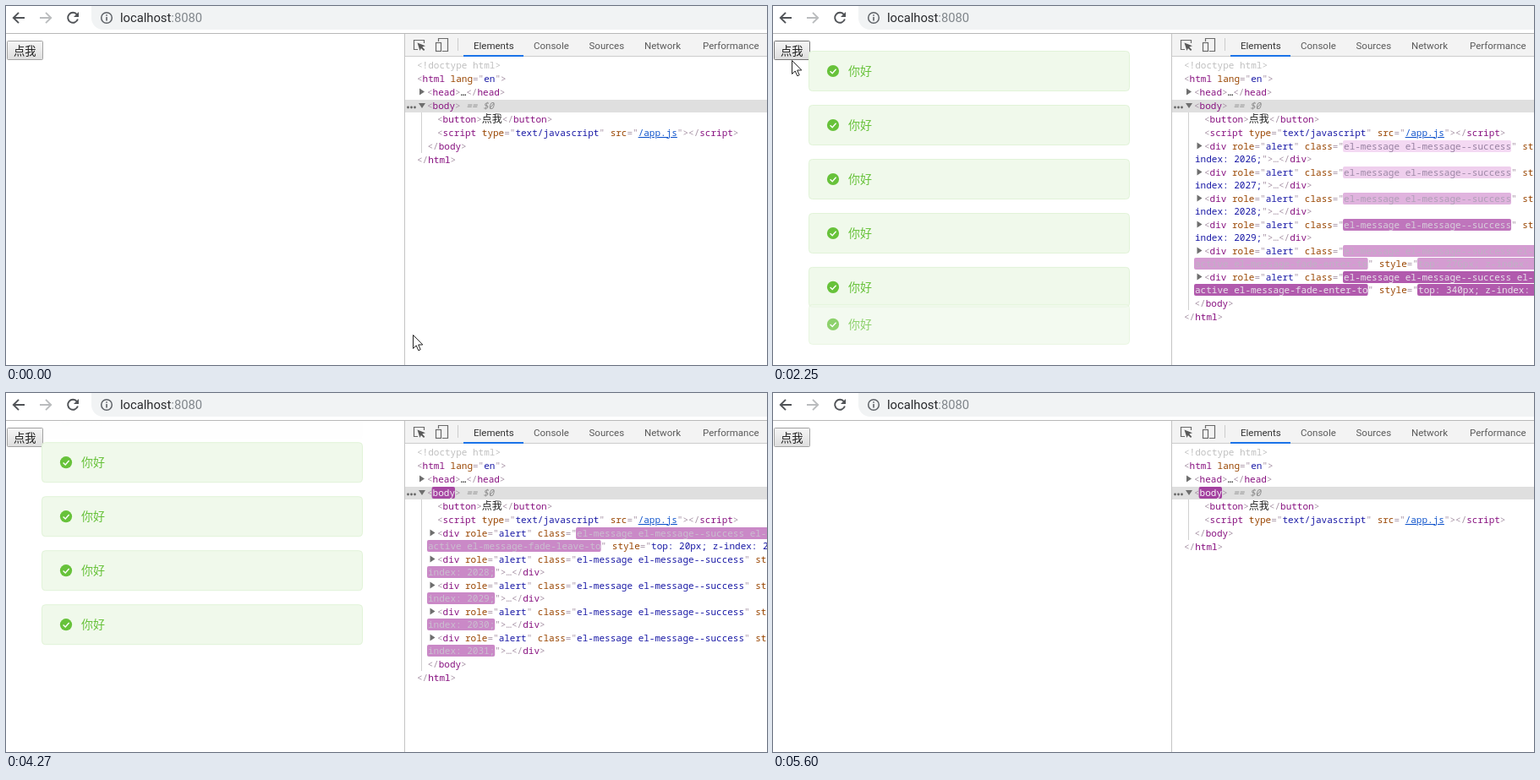
An HTML page that plays this animation: 900 by 425 pixels, repeating every 5.67 s.

```html
<!DOCTYPE html>
<html lang="en">
<head>
<meta charset="utf-8">
<title>Message demo</title>
<style>
html, body { margin: 0; width: 100%; height: 100%; overflow: hidden; background: #fff; }
svg { display: block; width: 100vw; height: 100vh; }
text { white-space: pre; }
.ui { font-family: Roboto, "Open Sans", sans-serif; }
.cjk { font-family: "Noto Sans CJK SC", "Noto Sans CJK", sans-serif; }
.code { font: 11px "Noto Sans Mono", "DejaVu Sans Mono", monospace; }
.code .cjk { font-size: 12px; fill: #222; }
.p { fill: #a894a6; }
.t { fill: #881280; }
.a { fill: #994500; }
.v { fill: #1a1aa6; }
.link { fill: #1155cc; text-decoration: underline; }
.doc { fill: #c0c0c0; }
.sel { fill: #8a8a8a; font-style: italic; }
.dots { fill: #303030; }
.arrow { fill: #6e6e6e; }
</style>
</head>
<body>
<svg viewBox="0 0 900 425" preserveAspectRatio="none">
  <defs>
    <linearGradient id="face" x2="0" y2="1">
      <stop offset="0" stop-color="#f6f6f6"/><stop offset="1" stop-color="#dedede"/>
    </linearGradient>
    <clipPath id="page"><rect y="33" width="471" height="392"/></clipPath>
  </defs>
  <rect width="900" height="425" fill="#fff"/>

  <!-- address bar -->
  <path d="M900 0H101V14A14 14 0 0 0 115 28H900Z" fill="#f1f3f4"/>
  <rect y="32" width="900" height="1" fill="#b8b8b8"/>
  <g fill="none" stroke-width="1.9">
    <path d="M22 14H9.5M15 7.8L8.8 14L15 20.2" stroke="#505357"/>
    <path d="M40 14H52.500M47 7.800L53.200 14L47 20.200" stroke="#babcbe"/>
    <path d="M84 10.200A6 6 0 1 0 84.900 15.500" stroke="#505357"/>
    <circle cx="119" cy="14" r="6.300" stroke="#5f6368" stroke-width="1.500"/>
    <path d="M119 13V17.500M119 10.200V11.800" stroke="#5f6368" stroke-width="1.600"/>
  </g>
  <path d="M86 7V13H80Z" fill="#505357"/>
  <text class="ui" x="135" y="19" font-size="14.75" fill="#28292c">localhost<tspan fill="#80868b">:8080</tspan></text>

  <!-- page -->
  <g clip-path="url(#page)">
    <rect id="button" x="1.5" y="41.5" width="42" height="22" rx="1" fill="url(#face)"/>
    <text class="cjk" x="9" y="58" font-size="13.33" fill="#222">点我</text>
    <g id="messages"></g>
  </g>

  <!-- inspector -->
  <rect x="472" y="33" width="428" height="27" fill="#f3f3f3"/>
  <rect x="472" y="59" width="428" height="1" fill="#ccc"/>
  <rect x="471" y="33" width="1" height="392" fill="#c4c4c4"/>
  <g fill="none" stroke="#6a6a6a" stroke-width="1.200">
    <path d="M487 51.500H482.500V40.500H494.500V44"/>
    <path d="M511.500 42V38.500H522.500V53.500H516"/>
    <rect x="508.500" y="43.500" width="6" height="10"/>
  </g>
  <path d="M486.500 43.500L496 47.300L492.300 48.600L495.300 51.800L494 53L490.900 49.900L489.500 53Z" fill="#5a5a5a"/>
  <rect x="534" y="38" width="1" height="15" fill="#ccc"/>
  <rect x="541" y="58" width="71" height="2" fill="#1a73e8"/>
  <g id="tabs" class="ui" font-size="11.5"></g>
  <rect x="472" y="111" width="428" height="15" fill="#dfdfdf"/>
  <g id="tree" class="code"></g>

  <path id="cursor" d="M.5 .5V16.500L4.200 13L6.800 18.800L9.200 17.700L6.700 12H11.800Z" fill="#fff" stroke="#222"/>
</svg>
<script>
const LOOP = 5670, STEP = LOOP / 73;
const CH = 6.6;                       // code column width
const ROW = 31;                       // height of a two-line node
const opens  = [820, 1060, 1340, 1641, 1880, 2118];
const closes = [3795, 4000, 4305, 4615, 4880, 5130];
const OPEN_LAG = 60, CLOSE_LAG = 45, MOVE = 400, FADE = 300, FLASH = 1400;

const $ = id => document.getElementById(id);
const clamp = x => Math.min(1, Math.max(0, x));
const mix = (a, b, k) => a + (b - a) * k;
const rgb = (a, b, k) => `rgb(${a.map((c, i) => Math.round(mix(c, b[i], k)))})`;

function bezier(x1, y1, x2, y2) {
  const at = (a, b, s) => 3 * a * s * (1 - s) ** 2 + 3 * b * s * s * (1 - s) + s ** 3;
  return x => {
    if (x <= 0) return 0;
    if (x >= 1) return 1;
    let lo = 0, hi = 1;
    for (let n = 0; n < 24; n++) {
      const mid = (lo + hi) / 2;
      if (at(x1, x2, mid) < x) lo = mid; else hi = mid;
    }
    return at(y1, y2, lo);
  };
}
const ease = bezier(.25, .1, .25, 1);
const settle = bezier(0, 0, .2, 1);
const glide = bezier(.42, 0, .58, 1);

// ---- page messages ----
function messageTop(i, t) {
  let from = 53 + 64 * i, to = from, start = 0;
  for (let k = 0; k < i && closes[k] <= t; k++) {
    from = mix(from, to, ease((closes[k] - start) / MOVE));
    to -= 64;
    start = closes[k];
  }
  return mix(from, to, ease((t - start) / MOVE));
}

function message(i, t) {
  const age = t - opens[i], gone = t - closes[i];
  if (age <= 0 || gone >= MOVE) return '';
  const shift = ease(age / MOVE) - 1 - ease(gone / MOVE);
  const alpha = ease(age / FADE) * (1 - ease(gone / FADE));
  const y = messageTop(i, t) + 48 * shift;
  return `<g transform="translate(42 ${y.toFixed(2)})" opacity="${alpha.toFixed(3)}">
    <rect x=".5" y=".5" width="379" height="47" rx="4" fill="#f0f9eb" stroke="#e1f3d8"/>
    <circle cx="29" cy="24" r="7.1" fill="#67c23a"/>
    <path d="M25.600 24.200L28.200 26.700L32.600 21.800" fill="none" stroke="#fff" stroke-width="1.400"/>
    <text class="cjk" x="47" y="29" font-size="14" fill="#67c23a">你好</text></g>`;
}

// ---- element tree ----
const span = (cls, s) => `<tspan class="${cls}">${s}</tspan>`;
const p = s => span('p', s.replace(/</g, '&lt;').replace(/>/g, '&gt;'));
const tag = s => span('t', s), attr = s => span('a', s), val = s => span('v', s);
const line = (x, y, s) => `<text x="${x}" y="${y}">${s}</text>`;
const end = name => p('</') + tag(name) + p('>');
const right = (x, y) => `<path class="arrow" d="M${x} ${y - 4}L${x + 6} ${y}L${x} ${y + 4}Z"/>`;

const BLUE = [26, 26, 166], PURPLE = [136, 18, 128];

// Text with a highlight that fades out; col counts from the row start.
function flashed(x, y, col, s, age, base) {
  if (!(age >= 0 && age < FLASH)) return { rect: '', text: `<tspan fill="rgb(${base})">${s}</tspan>` };
  const pale = [245, 219, 244], grey = [150, 128, 160];
  const first = settle(age / FLASH / .8), last = settle((age / FLASH - .8) / .2);
  const bg = last > 0 ? rgb(pale, [255, 255, 255], last) : rgb([158, 54, 153], pale, first);
  const fg = last > 0 ? rgb(grey, base, last) : rgb([255, 255, 255], grey, first);
  return {
    rect: `<rect x="${x + col * CH - 1}" y="${y - 11}" width="${s.length * CH + 1}" height="14" rx="2" fill="${bg}"/>`,
    text: `<tspan fill="${fg}">${s}</tspan>`
  };
}

function styleAge(i, t) {
  let age = -1;
  for (let k = 0; k < i; k++) {
    const d = t - closes[k] - CLOSE_LAG;
    if (d >= 0) age = d;
  }
  return age;
}

function node(i, t, y) {
  const age = t - opens[i] - OPEN_LAG, gone = t - closes[i] - CLOSE_LAG;
  const leaving = gone >= 0, entering = !leaving && age < MOVE;
  const phase = leaving ? 'leave' : 'enter', wide = leaving || entering;
  const classAge = leaving ? gone : entering ? age : age - MOVE;
  const look = leaving ? -1 : entering ? age : styleAge(i, t);
  const shift = closes.filter((c, k) => k < i && t >= c + CLOSE_LAG).length;
  const top = `top: ${20 + 64 * (i - shift)}px; z-`, index = `index: ${2026 + i};`;
  const name = 'el-message el-message--success' + (wide ? ` el-message-fade-${phase}-` : '');
  const rest = `active el-message-fade-${phase}-to`;
  const y2 = y + 15;

  const cls = flashed(510, y, 25, name, classAge, BLUE);
  const head = p('<') + tag('div') + attr(' role') + p('="') + val('alert') + p('"') + attr(' class') + p('="') + cls.text;
  const style = p('"') + attr(' style') + p('="');
  const tail = p('">…') + end('div');
  let rects = cls.rect, one = head, two;
  if (wide) {
    const more = flashed(499, y2, 0, rest, classAge, BLUE);
    const css = flashed(499, y2, rest.length + 9, top + index, look, BLUE);
    rects += more.rect + css.rect;
    two = more.text + style + css.text + tail;
  } else {
    const a = flashed(510, y, 25 + name.length + 9, top, look, BLUE);
    const b = flashed(499, y2, 0, index, look, BLUE);
    rects += a.rect + b.rect;
    one += style + a.text;
    two = b.text + tail;
  }
  return rects + right(501.5, y - 4.5) + line(510, y, one) + line(499, y2, two);
}

function tree(t) {
  const live = opens.map((o, i) => i).filter(i => t >= opens[i] + OPEN_LAG && t < closes[i] + MOVE + CLOSE_LAG);
  let removed = -1;
  for (const c of closes) {
    const d = t - c - MOVE - CLOSE_LAG;
    if (d >= 0) removed = d;
  }
  const body = flashed(498, 122, 1, 'body', removed, PURPLE);
  const bottom = 170 + ROW * live.length;
  return `<rect x="491" y="126" width="1" height="${bottom - 122}" fill="#d0d0d0"/>` +
    line(486, 74, span('doc', '&lt;!doctype html&gt;')) +
    line(486, 90, p('<') + tag('html') + attr(' lang') + p('="') + val('en') + p('">')) +
    right(489, 101.5) + line(498, 106, p('<') + tag('head') + p('>') + '…' + end('head')) +
    [475.5, 479.5, 483.5].map(x => `<circle cx="${x}" cy="120" r="1.4" fill="#666"/>`).join('') +
    `<path class="arrow" d="M488 115H496L492 121Z"/>` +
    body.rect + line(498, 122, p('<') + body.text + p('>') + span('sel', ' == $0')) +
    line(510, 138, p('<') + tag('button') + p('>') + span('cjk', '点我') + end('button')) +
    line(510, 154, p('<') + tag('script') + attr(' type') + p('="') + val('text/javascript') + p('"') +
      attr(' src') + p('="') + span('link', '/app.js') + p('">') + end('script')) +
    live.map((i, n) => node(i, t, 170 + ROW * n)).join('') +
    line(498.5, bottom, end('body')) + line(486, bottom + 16, end('html'));
}

// ---- playback ----
function render(t) {
  const move = glide(clamp((t - 20) / 520));
  const slip = glide(clamp((t - 2120) / 120));
  const x = mix(481, 32, move) - 10 * slip, y = mix(389, 57, move) + 7 * slip;
  const shown = t < 2300;
  $('cursor').setAttribute('transform', `translate(${x} ${y})`);
  $('cursor').setAttribute('visibility', shown ? 'visible' : 'hidden');
  $('button').setAttribute('stroke', shown && move > .97 ? '#757575' : '#a2a2a2');
  $('messages').innerHTML = opens.map((o, i) => message(i, t)).join('');
  $('tree').innerHTML = tree(t);
}

$('tabs').innerHTML = [['Elements', 553], ['Console', 624], ['Sources', 689.5], ['Network', 755], ['Performance', 824]]
  .map(([s, x], i) => `<text x="${x}" y="51" fill="${i ? '#5a5a5a' : '#333'}">${s}</text>`).join('');

// The picture holds between steps, like a screen recording.
let shownStep = -1;
function tick() {
  const step = Math.min(72, Math.floor((performance.now() % LOOP + 20) / STEP));
  if (step !== shownStep) render((shownStep = step) * STEP);
  requestAnimationFrame(tick);
}
tick();
</script>
</body>
</html>
```
